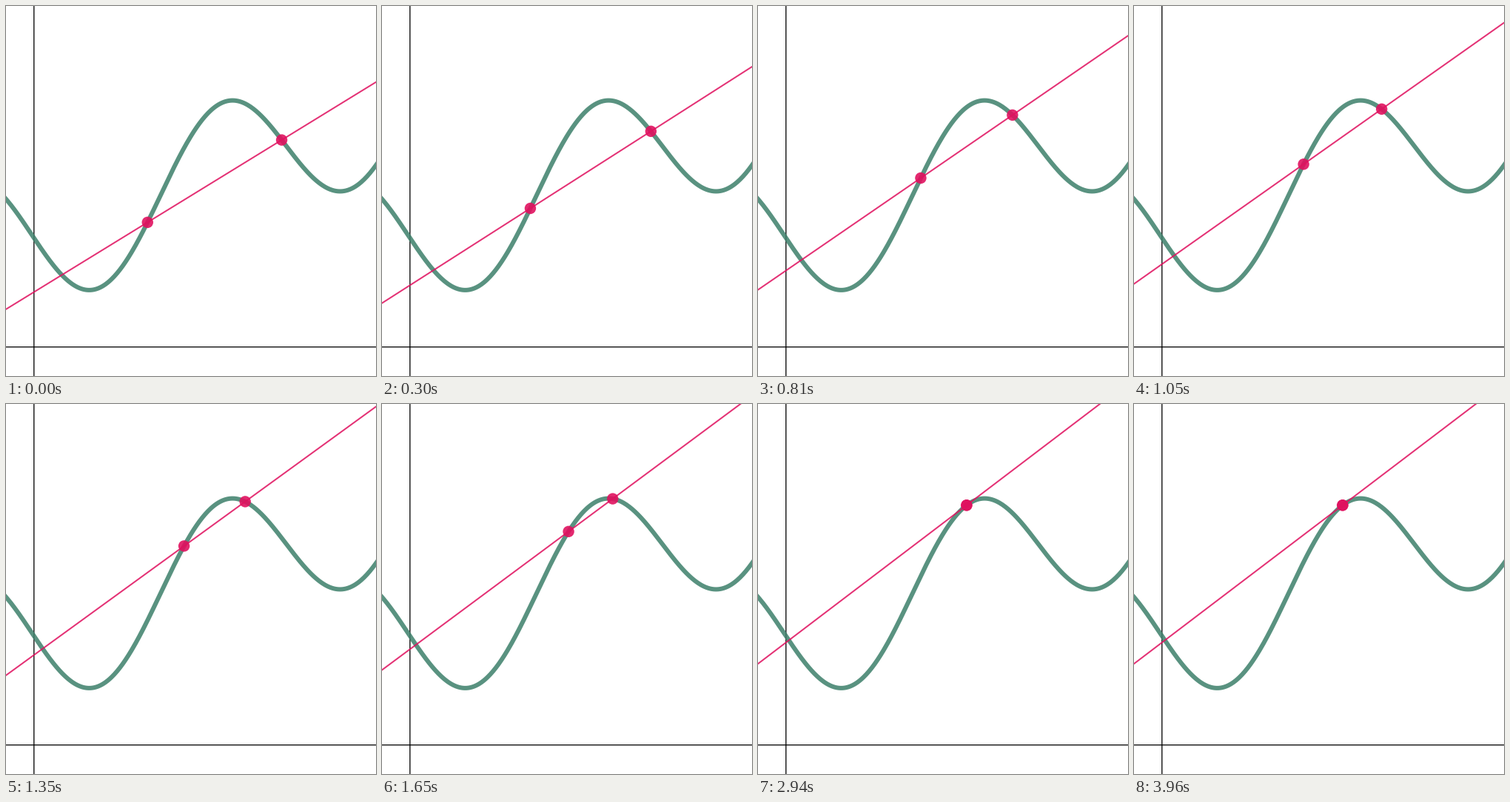
A matplotlib script that plays this animation: 500 by 500 pixels, repeating every 3.99 s.

```python
import numpy as np
import matplotlib.pyplot as plt
from matplotlib.animation import FuncAnimation
from matplotlib.patches import Circle

SIZE, DPI = 500, 100
PX = 72 / DPI                      # one pixel in points
FRAMES, INTERVAL = 133, 30
MOVE_STEPS, RAMP = 83, 4           # closing time and easing time, in frames

GREEN, RUBY = "#40826D", "#E0115F"
AXIS_X, AXIS_Y = 37.8, 460.8

# Curve around the point of tangency, in pixels
CX, CY = 281.9, 136.8
OMEGA = 0.018453
COS_AMP, SQUARE = 91.2, 7e-5
SIN_AMP, SLOPE, CUBE = 18.53, 0.418, -9e-7
START_GAP = 90.65


def even_part(e):
    return COS_AMP * (1 - np.cos(OMEGA * e)) - SQUARE * e**2


def odd_part(e):
    return -(SLOPE * e + CUBE * e**3 + SIN_AMP * np.sin(OMEGA * e))


def curve(x):
    e = x - CX
    return CY + even_part(e) + odd_part(e)


def secant_slope(gap):
    """Slope of the chord over CX +- gap; the tangent's slope at zero."""
    wave = SIN_AMP * OMEGA * np.sinc(OMEGA * gap / np.pi)
    return -(SLOPE + CUBE * gap**2 + wave)


def progress(step):
    """Constant speed with a short ramp at both ends."""
    t = min(step, MOVE_STEPS)
    speed = 1 / (MOVE_STEPS - RAMP)
    if t < RAMP:
        return speed * t**2 / (2 * RAMP)
    left = MOVE_STEPS - t
    if left < RAMP:
        return 1 - speed * left**2 / (2 * RAMP)
    return speed * (t - RAMP / 2)


fig = plt.figure(figsize=(SIZE / DPI, SIZE / DPI), dpi=DPI, facecolor="white")
ax = fig.add_axes([0, 0, 1, 1])
ax.set(xlim=(0, SIZE), ylim=(SIZE, 0))
ax.axis("off")

axis_style = dict(color="black", lw=1.3 * PX, snap=False)
ax.plot([AXIS_X, AXIS_X], [-5, SIZE + 5], **axis_style)
ax.plot([-5, SIZE + 5], [AXIS_Y, AXIS_Y], **axis_style)

xs = np.linspace(-10, SIZE + 10, 400)
ax.plot(xs, curve(xs), color=GREEN, alpha=0.87, lw=6 * PX)

ends = np.array([-20, SIZE + 20])
secant, = ax.plot([], [], color=RUBY, alpha=0.87, lw=2 * PX)
dots = [ax.add_patch(Circle((CX, CY), 7.7, fc=RUBY, lw=0, alpha=0.9, zorder=3))
        for _ in range(2)]


def draw(frame):
    gap = START_GAP * (1 - progress(frame))
    secant.set_data(ends, CY + even_part(gap) + secant_slope(gap) * (ends - CX))
    for dot, side in zip(dots, (-1, 1)):
        x = CX + side * gap
        dot.center = (x, curve(x))
    return [secant, *dots]


anim = FuncAnimation(fig, draw, frames=FRAMES, interval=INTERVAL,
                     repeat=True, repeat_delay=0)
plt.show()
```
